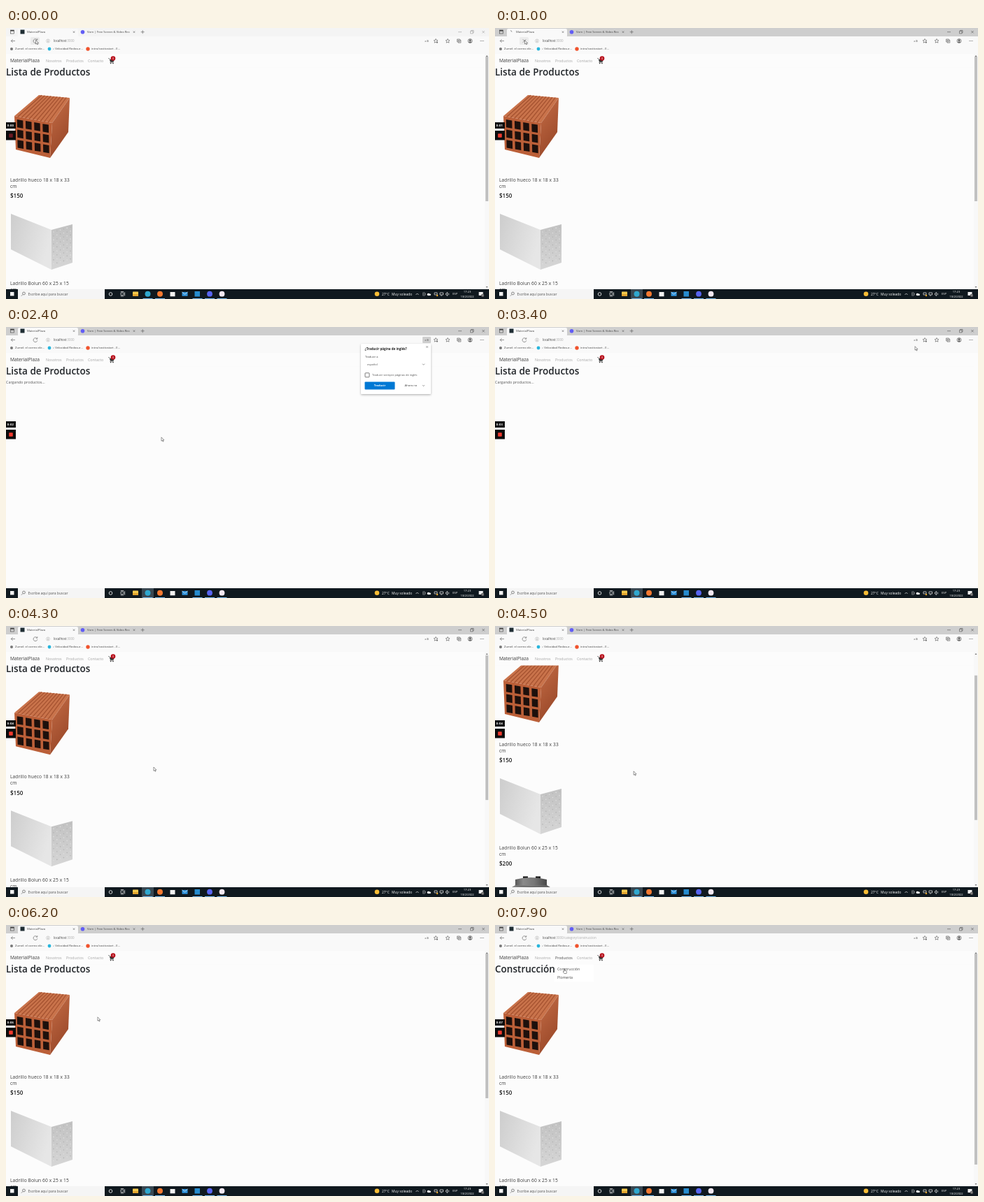
Animation, 690 px wide and 388 px high, one loop 8 s. Source, as an HTML page:

```html
<!DOCTYPE html>
<html lang="es">
<head>
<meta charset="utf-8">
<title>Lista de Productos</title>
<style>
html, body { margin: 0; height: 100%; overflow: hidden; background: #fcfcfc; }
svg { display: block; width: 690px; height: 388px; font-family: "Open Sans", "Noto Sans", sans-serif; }
text { white-space: pre; }
.line { fill: none; stroke: #555; stroke-width: .6; }
.pale { fill: none; stroke: #eee; stroke-width: .7; }
</style>
</head>
<body>
<svg id="stage" viewBox="0 0 690 388"></svg>
<script>
// Markup helpers; y of a text is the middle of its line
const rect = (x, y, w, h, fill, more = '') =>
  `<rect x="${x}" y="${y}" width="${w}" height="${h}" fill="${fill}" ${more}/>`;
const dot = (x, y, r, fill, more = '') => `<circle cx="${x}" cy="${y}" r="${r}" fill="${fill}" ${more}/>`;
const poly = (points, fill) => `<polygon points="${points}" fill="${fill}"/>`;
const line = (d, cls = 'line') => `<path class="${cls}" d="${d}"/>`;
const text = (x, y, size, str, fill = '#444', more = '') =>
  `<text x="${x}" y="${y + size * .35}" font-size="${size}" fill="${fill}" ${more}>${str}</text>`;
const group = (id, body, more = '') => `<g id="${id}" ${more}>${body}</g>`;
const grid = (cols, rows, cell) =>
  Array.from({ length: cols * rows }, (_, k) => cell(k % cols, Math.floor(k / cols))).join('');
const chevron = (x, y) => line(`M${x - 1.5} ${y - .8}l1.5 1.6 1.5-1.6`);
const cross = (x, y, r) => line(`M${x - r} ${y - r}l${2 * r} ${2 * r}m0 ${-2 * r}l${-2 * r} ${2 * r}`);
const star = (x, y) => line(`M${x} ${y - 3}l.9 2 2 .2-1.5 1.4.5 2.1-1.9-1.1-1.9 1.1.5-2.1-1.5-1.4 2-.2z`);
const bold = 'font-weight="600"';

const defs = `<defs>
  <clipPath id="view"><rect y="37" width="690" height="337"/></clipPath>
  <linearGradient id="slab" x2="1" y2=".4"><stop stop-color="#cdcdcd"/><stop offset=".5" stop-color="#dadada"/><stop offset="1" stop-color="#e6e6e6"/></linearGradient>
  <linearGradient id="side" x2="0" y2="1"><stop stop-color="#c2c2c2"/><stop offset="1" stop-color="#d6d6d6"/></linearGradient>
  <linearGradient id="steel"><stop stop-color="#585858"/><stop offset=".25" stop-color="#8a8a8a"/><stop offset=".6" stop-color="#777"/><stop offset="1" stop-color="#484848"/></linearGradient>
  <linearGradient id="clay" x2=".4" y2="1"><stop stop-color="#c66e47"/><stop offset="1" stop-color="#9a4829"/></linearGradient>
  <filter id="shadow" x="-10%" y="-10%" width="120%" height="125%"><feDropShadow dx="0" dy="1.2" stdDeviation="1.8" flood-opacity=".3"/></filter>
</defs>`;

const brick =
  poly('12,126 47,96 91,100 66,136', '#c9734b') +
  poly('66,136 91,100 89,149 63,186', 'url(#clay)') +
  poly('12,126 66,136 63,186 14,174', '#bb5f38') +
  grid(9, 1, i => `<path d="M${17 + i * 5.4} ${127 + i}L${51 + i * 4.4} ${96.3 + i * .4}" stroke="#a4512f" stroke-width="1.2"/>`) +
  `<g transform="matrix(53 9 1 48 12 126)">` +
  grid(4, 3, (i, j) => rect(.07 + .23 * i, .09 + .305 * j, .16, .235, '#1d100c')) + '</g>';

const block =
  poly('7,266 65,289 65,346 7,317', 'url(#slab)') +
  poly('65,289 95,281 95,336 65,346', 'url(#side)') +
  grid(6, 9, (i, j) => dot(68 + i * 4.8, 292 + j * 5.7 - i * 1.4, .8, (i + j) % 2 ? '#b4b4b4' : '#dedede'));

const tank =
  rect(40, 406.5, 7, 3, '#161616') + rect(58, 406.5, 7, 3, '#161616') +
  `<path d="M29 420V411Q51 405 74 411V420Z" fill="url(#steel)"/>` +
  `<path d="M29 419H74L92 430Q95 432 95 436V511Q52 521 8 511V436Q8 432 11 430Z" fill="url(#steel)"/>` +
  [420, 432].map(y => `<path d="M${y < 430 ? '29 420Q52 423 74 420' : '9 432Q52 437 94 432'}" fill="none" stroke="#555" stroke-width=".8"/>`).join('') +
  rect(44, 441, 16, 16, '#161616') + dot(11, 508, 2.5, '#161616');

const label = (y, name, price) =>
  text(6, y, 6.6, name, '#3a3a3a', 'letter-spacing=".12"') +
  text(6, y + 9, 6.6, 'cm', '#3a3a3a', 'letter-spacing=".12"') +
  text(6, y + 22.5, 8.1, price, '#222', bold);

const page = group('page',
  text(0, 63.5, 13.55, 'Lista de Productos', '#212529', bold + ' id="heading"') +
  group('wait', text(0, 79, 5.4, 'Cargando productos...', '#555')) +
  group('goods',
    brick + label(218, 'Ladrillo hueco 18 x 18 x 33', '$150') +
    block + label(366, 'Ladrillo Bolun 60 x 25 x 15', '$200') + group('third', tank)));

const nav = rect(0, 37, 684, 19.5, '#fcfcfc') +
  text(6, 47, 6.7, 'MaterialPlaza', '#3a3a3a') +
  text(57, 47, 5.3, 'Nosotros', '#a4a4a4') +
  text(86, 47, 5.25, 'Productos', '#a4a4a4', 'id="menu"') +
  text(117, 47, 5.3, 'Contacto', '#a4a4a4') +
  line('M146 43.5h1.6l1.6 5h4.2l1-3.5h-6M149.2 48.5l-.4 1.3h4.8') +
  poly('148.3,45 154.5,45 153.4,48.5 149.2,48.5', '#333') +
  dot(149.6, 50.6, .8, '#333') + dot(153, 50.6, .8, '#333') +
  dot(153, 43.5, 3.3, '#b80f1b') + text(151.9, 43.5, 4, '0', '#fff');

const scrollbar = group('bar',
  rect(684, 37, 6, 337, '#f8f8f8') + rect(685, 41, 4, 207, '#c1c1c1', 'id="thumb"') +
  poly('685.5,41 687,39 688.5,41', '#777') + poly('685.5,370 687,372 688.5,370', '#777'));

const drop = group('drop',
  rect(85, 56.5, 56, 25, '#fff') + text(89, 63.5, 5.25, 'Construcción') +
  text(89, 75, 5.25, 'Plomería'));

const status = group('status',
  rect(0, 365, 76, 9, '#f1f1f1') + text(2, 369.5, 3.9, '', '#555', 'id="link"'));

const tabs = rect(0, 0, 690, 12, '#cecece', 'id="strip"') +
  rect(17, 1, 86, 12, '#f9f9f9', 'rx="2"') +
  rect(6.5, 3, 5, 5, 'none', 'stroke="#444" stroke-width=".6"') + rect(6.5, 3, 5, 1.6, '#444') +
  group('icon', rect(20.5, 2.5, 6, 6, '#1f2d33')) +
  group('spin', line('M22 3.7a2 2 0 0 1 2 2')) +
  text(30, 5.7, 4.15, 'MaterialPlaza') + cross(97, 5.7, 1.2) +
  dot(109.5, 5.7, 2.8, '#625df5') + text(116, 5.7, 4.2, 'Vorn | Free Screen &amp; Video Rec') +
  cross(183, 5.7, 1.2) + line('M192.7 5.7h5M195.2 3.2v5') +
  group('controls', line('M646 5.7h5M663.5 4.4h3.5v3.5h-3.5zM664.5 4.4v-1h3.5v3.5h-1') + cross(682, 5.7, 1.7));

const toolbar = rect(0, 12, 690, 25, '#f9f9f9') +
  line('M13 18.5H7.3m2.4-2.4l-2.4 2.4 2.4 2.4') +
  group('hover', rect(35, 13, 13, 11, '#ececec', 'rx="1.5"')) +
  group('reload', line('M44.2 16.8a2.9 2.9 0 1 0 .6 2.5M44.8 15.2v2h-2')) +
  group('stop', cross(42, 18.5, 2.2)) +
  dot(60, 18.5, 2.5, 'none', 'stroke="#aaa" stroke-width=".5"') +
  line('M60 18.2v1.7M60 16.9v.6') +
  text(68, 18.5, 4.4, 'localhost<tspan id="path" fill="#aaa">:3000</tspan>') +
  group('lit', rect(595, 14, 12, 9, '#cfcfcf', 'rx="1"')) +
  text(598.3, 18.5, 3.8, 'aあ', '#666') + star(614, 18.5) + dot(616, 20.5, 1.1, '#777') + star(631, 18.5) +
  line('M644.5 16h3.8v3.8h-3.8zM646 19.8v1.3h3.8v-3.8h-1.5M646.4 16.7v2.4m-1.2-1.2h2.4') +
  dot(663, 18.5, 3, '#d8d8d8', 'stroke="#555" stroke-width=".6"') + dot(663, 17.6, 1.2, '#444') +
  `<path d="M661 20.8q2-3 4 0z" fill="#444"/>` +
  [678, 680, 682].map(x => dot(x, 18.5, .5, '#444')).join('') +
  dot(8, 30, 2, '#777') + text(13, 30, 4.2, 'Zumel: el correo ele...') +
  dot(62, 30, 2.4, '#28b5dc') + text(67, 30, 4.2, ':: Velocidad Redosur...') +
  dot(117, 30, 2.7, '#f0532d') + text(122, 30, 4.2, 'intro/costtostart - E...');

const popup = group('popup',
  rect(507, 24, 100, 72, '#fff', 'rx="1.5" filter="url(#shadow)"') +
  text(512.5, 31, 4.5, '¿Traducir página de inglés?', '#222', 'font-weight="700"') + cross(601.5, 28.5, 1.2) +
  text(513, 43, 4, 'Traducir a') + text(516, 53.5, 4, 'español', '#555') + chevron(596.5, 53.5) +
  rect(513, 65.8, 6, 6, '#fff', 'stroke="#444" stroke-width=".7" rx=".7"') +
  text(523, 69, 4, 'Traducir siempre páginas de inglés', '#555') +
  rect(512.5, 78.5, 43, 11, '#0078d4', 'rx="1"') +
  text(534, 84, 4, 'Traducir', '#fff', 'font-weight="700" text-anchor="middle"') +
  text(569.5, 84, 4.2, 'Ahora no') + chevron(596.5, 84));

const taskbar = rect(0, 374, 690, 14, '#10191f') +
  rect(6, 378, 5.5, 5.5, '#f4f4f4') + rect(17, 374, 124, 14, '#f5f5f5') +
  dot(25.5, 380, 1.9, 'none', 'stroke="#444" stroke-width=".6"') + line('M24 381.5l-2.2 2.3') +
  text(31.5, 381, 5, 'Escribe aquí para buscar', '#555') +
  dot(149.5, 381, 2.3, 'none', 'stroke="#fff" stroke-width=".8"') +
  line('M164 379h4v3.6h-4zM169.6 378.3v5.2M163.8 377.5h4.4M163.8 384h4.4', 'pale') +
  group('active', rect(194, 374, 17, 14, '#3a4852')) +
  rect(181, 377.5, 8, 6.5, '#f6c94c', 'rx=".7"') + rect(181, 381, 8, 3, '#e3a52f') +
  dot(202.5, 380.7, 4, '#2fa8cf') + dot(220, 380.7, 4, '#f47a31') +
  rect(234.5, 378, 7, 6.3, '#f3f3f3') + rect(251.5, 378, 8, 5.8, '#2f93dc') +
  line('M251.5 378l4 3.3 4-3.3', 'pale') +
  rect(269.5, 377, 7.5, 7.5, '#268ccf') + dot(291, 380.7, 3.9, '#5865f2') + dot(308.5, 380.7, 3.9, '#f2e9f2') +
  [202.5, 220, 273.5, 291, 308.5].map(x => rect(x - 7, 387, 14, 1, '#76b9ed')).join('') +
  dot(530, 380.7, 3.3, '#f8bd35') +
  text(537, 381, 4.9, '27°C', '#fff') + text(551, 381, 4.9, 'Muy soleado', '#fff') +
  line('M585.5 382l2-2 2 2M596 378.5v5m1.5-5a3 3 0 0 1 0 5M612 379h4v3h-4zM620 379h4.5v3H620zM622 382v2M628.5 382v-2l2-1.5v5zM632 379.5q1.5 1.5 0 3', 'pale') +
  dot(603.5, 381.5, 1.8, '#fff') + dot(605.5, 381.8, 1.4, '#fff') + dot(616, 383, 1.2, '#e8a72d') +
  text(638, 381, 4.1, 'ESP', '#fff') + text(659, 378, 4.1, '17:23', '#fff', 'text-anchor="middle"') +
  text(659, 384.3, 4.1, '10/2/2022', '#fff', 'text-anchor="middle"') +
  rect(675.5, 378, 6, 5, '#f3f3f3') + dot(681, 383, 2.2, '#555') + text(680, 383, 3, '4', '#fff');

const recorder = rect(0, 135, 14, 9, '#0c0c0c') +
  text(1.8, 139.6, 4.2, '', '#fff', 'id="clock" font-weight="700" letter-spacing=".25"') +
  rect(0, 147, 14, 13.5, '#0c0c0c') + rect(4.2, 151.2, 5.6, 5.6, '#f03a2e', 'id="rec" rx=".7"');

const edge = 'fill="#fff" stroke="#333" stroke-width=".5" stroke-linejoin="round"';
const pointer = group('pointer',
  `<path id="arrow" d="M0 0v5.4l1.3-1.1.9 2 .9-.4-.8-1.9h1.7z" ${edge}/>` +
  `<path id="hand" d="M0 .7q.5-1 1 0v2.5l2.4.6q.8.3.6 1.2l-.5 2.5H.4L-1.5 4.8q.3-.9 1.5 0z" ${edge}/>`);

const stage = document.getElementById('stage');
stage.innerHTML = defs + rect(0, 0, 690, 388, '#fcfcfc') +
  `<g clip-path="url(#view)">${page}</g>` + nav + scrollbar + drop + status +
  tabs + toolbar + popup + taskbar + recorder + pointer;

const $ = id => document.getElementById(id);
const show = (id, on) => $(id).setAttribute('display', on ? 'inline' : 'none');
const clamp = v => Math.max(0, Math.min(1, v));
const ramp = (t, from, to) => {
  const p = clamp((t - from) / (to - from));
  return p < .5 ? 4 * p ** 3 : 1 - 4 * (1 - p) ** 3;
};

// Time, x, y of the pointer tip
const trail = [
  [0, 42.5, 17.5], [1300, 42.5, 17.5], [2200, 221.5, 158], [2400, 221.5, 158],
  [3200, 600.5, 27.5], [3400, 600.5, 27.5], [4200, 211, 202], [4300, 211, 202],
  [5000, 166, 222.5], [5500, 166, 222.5], [6200, 131, 132], [6500, 112, 76],
  [6800, 98.5, 46], [7000, 98.5, 46], [7300, 98.5, 62], [8000, 98.5, 62]];

function place(t) {
  const i = trail.findIndex(p => p[0] > t);
  const [a, x, y] = trail[i - 1], [b, u, v] = trail[i];
  const p = (t - a) / (b - a);
  return [x + (u - x) * p, y + (v - y) * p];
}

function draw(t) {
  const focused = t >= 100;
  const loading = t >= 600 && t < 1600;
  const waiting = t >= 1400 && t < 3600;
  const asking = t >= 1700 && t < 3300;
  const category = t >= 7600;
  const scroll = 151 * (ramp(t, 4200, 4900) - ramp(t, 5200, 5400));

  show('active', focused);
  $('strip').setAttribute('fill', focused ? '#cecece' : '#f4f4f4');
  $('controls').setAttribute('opacity', focused ? 1 : .55);
  show('icon', !loading);
  show('spin', loading);
  $('spin').setAttribute('transform', `rotate(${t * .36 - 360} 22 5.7)`);
  show('hover', t < 1400);
  show('reload', !loading);
  show('stop', loading);
  show('popup', asking);
  show('lit', asking);
  show('wait', waiting);
  show('goods', !waiting);
  show('bar', !waiting);
  show('third', !category);
  show('drop', t >= 6800);
  show('status', t >= 7000 && !category);

  $('page').setAttribute('transform', `translate(0 ${-scroll})`);
  $('thumb').setAttribute('y', 41 + scroll * .62);
  $('thumb').setAttribute('height', category ? 302 : 207);
  $('heading').textContent = category ? 'Construcción' : 'Lista de Productos';
  $('path').textContent = category ? ':3000/category/construccion' : ':3000';
  $('link').textContent = 'localhost:3000' + (t >= 7400 ? '/category/construccion' : '');
  $('menu').setAttribute('fill', t >= 6700 ? '#444' : '#a4a4a4');
  $('clock').textContent = '0:0' + Math.floor(t / 1000);
  $('rec').setAttribute('fill', t < 500 ? '#6a1a22' : '#f03a2e');

  $('pointer').setAttribute('transform', `translate(${place(t)})`);
  show('arrow', t < 6700);
  show('hand', t >= 6700);
}

const start = performance.now();
function tick() {
  draw((performance.now() - start) % 8000);
  requestAnimationFrame(tick);
}
tick();
</script>
</body>
</html>
```
